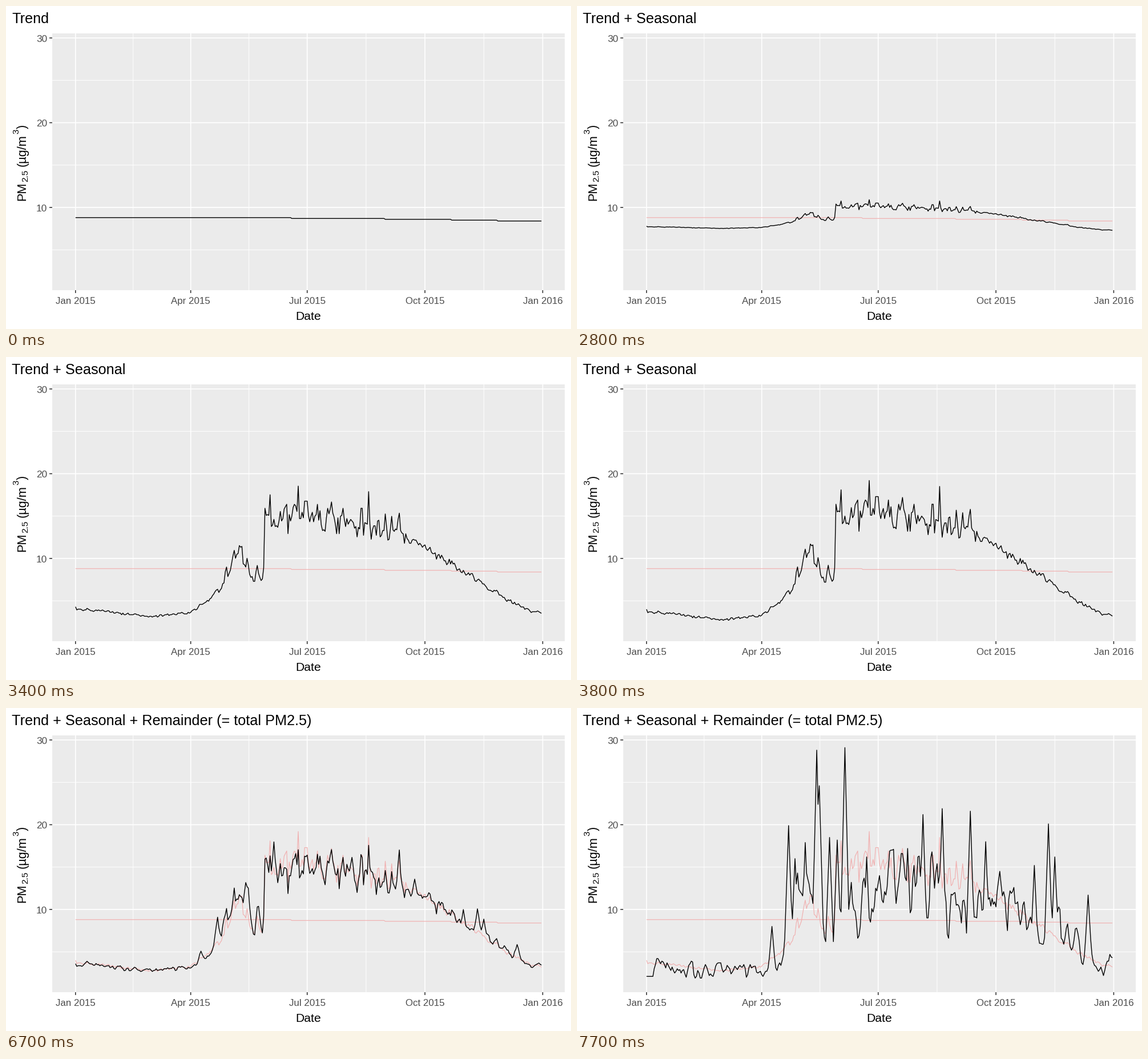
Animation, 990 px wide and 566 px high, one loop 10000 ms. Source, as a matplotlib script:

```python
import numpy as np
import matplotlib.pyplot as plt
from matplotlib.animation import FuncAnimation
from matplotlib.patches import Rectangle

W, H, DPI = 990, 566, 100
LEFT, RIGHT, TOP, BOTTOM = 81, 979, 48, 498
PX = 72 / DPI                      # one pixel in points
MORPH = 16                         # steps of one transition
STARTS = (23, 62)                  # first step of each transition
TITLES = ("Trend", "Trend + Seasonal",
          "Trend + Seasonal + Remainder (= total PM2.5)")

days = np.arange(365)


def px(day):
    return 121.8 + day * 2.2428


def py(value):
    return 353 - (value - 10) * 14.85


def series(level, spikes, wobble, smooth, seed):
    """Key levels with relative noise, topped by a few pointed spikes."""
    white = np.random.default_rng(seed).normal(size=days.size)
    noise = np.convolve(white, [smooth, 1, smooth], "same")
    noise = np.clip(noise / noise.std(), -1.7, 1.7)
    values = np.interp(days, *zip(*level)) * (1 + wobble * noise)
    for day, top in spikes:
        values = np.maximum(values, top * (1 - np.abs(days - day) / 4.5))
    return np.round(values, 1)


def ease(t):
    """Cubic in and out."""
    return 4 * t**3 if t < 0.5 else 1 - 4 * (1 - t)**3


trend = 8.8 - 0.1 * np.searchsorted([168, 241, 293, 329], days)
windy = np.where((days > 116) & (days < 258), 0.085, 0.03)
seasonal = series(
    [(0, 3.8), (58, 2.8), (88, 3.2), (104, 4.8), (114, 6.4), (120, 9.2),
     (130, 10.5), (138, 7.6), (147, 8.6), (148, 15.2), (225, 15),
     (256, 12.8), (274, 11.2), (305, 8.4), (335, 5.1), (356, 3.4), (364, 3.4)],
    [(152, 18.1), (174, 19.2), (229, 18.5), (253, 15.8)], windy, 0.2, 3)
total = series(
    [(0, 3.2), (84, 2.6), (108, 4), (112, 10), (128, 12.5), (138, 7),
     (151, 4.5), (158, 11), (165, 7), (172, 12), (230, 14), (236, 9),
     (274, 12), (290, 9.5), (325, 8), (340, 5), (353, 2.6), (364, 4.6)],
    [(98, 8), (111, 19.9), (116, 16), (124, 17.9), (133, 28.8), (135, 24.6),
     (143, 18.5), (149, 18.2), (155, 29.1), (172, 16.2), (204, 17.2),
     (216, 21.2), (231, 21.9), (253, 21.6), (265, 18), (303, 15.2),
     (314, 20.1), (319, 16.2), (345, 11.7)], 0.2, 0.7, 8)
states = [trend, seasonal, total]

plt.rcParams["font.family"] = "Liberation Sans"
fig = plt.figure(figsize=(W / DPI, H / DPI), dpi=DPI, facecolor="white")
ax = fig.add_axes([0, 0, 1, 1])
ax.set(xlim=(0, W), ylim=(H, 0))
ax.axis("off")


def box(x, y, w, h, color):
    ax.add_patch(Rectangle((x, y), w, h, fc=color, lw=0, snap=False,
                           zorder=1))


def vline(x, y0, y1, width, color="white"):
    box(x - width / 2, y0, width, y1 - y0, color)


def hline(y, x0, x1, width, color="white"):
    box(x0, y - width / 2, x1 - x0, width, color)


def label(x, y, text, size, color="black", **kw):
    return ax.text(x, y, text, fontsize=size * PX, color=color,
                   va="baseline", **kw)


def curve(color, width, z):
    return ax.plot([], [], color=color, lw=width * PX, zorder=z,
                   solid_capstyle="butt", solid_joinstyle="round")[0]


# Panel and grid
box(LEFT, TOP, RIGHT - LEFT, BOTTOM - TOP, "#ebebeb")
months = [(0, "Jan 2015"), (90, "Apr 2015"), (181, "Jul 2015"),
          (273, "Oct 2015"), (365, "Jan 2016")]
for (a, _), (b, _) in zip(months, months[1:]):
    vline(px((a + b) / 2), TOP, BOTTOM, 1)
for value in (5, 15, 25):
    hline(py(value), LEFT, RIGHT, 1)
for day, name in months:
    vline(px(day), TOP, BOTTOM, 1.7)
    vline(px(day), BOTTOM, BOTTOM + 5, 1.6, "#333333")
    label(px(day), 522, name, 16.9, "#4d4d4d", ha="center")
for value in (10, 20, 30):
    hline(py(value), LEFT, RIGHT, 1.7)
    hline(py(value), LEFT - 5, LEFT, 1.6, "#333333")
    label(72, py(value) + 6.7, str(value), 17.2, "#4d4d4d", ha="right")

# Axis titles
label(530, 550, "Date", 21.2, ha="center")
for x, y, text, size in ((34.5, 340.8, "PM", 21.6), (38.5, 308.5, "2.5", 15.4),
                         (34.5, 280.8, "(µg/m", 21.6), (22.5, 224.5, "3", 15.4),
                         (34.5, 214.8, ")", 21.6)):
    label(x, y, text, size, rotation=90, rotation_mode="anchor", ha="left")

title = label(10.3, 30, "", 25.25, ha="left")
shadows = [curve("#f1b0b0", 1.2, 2), curve("#f1b0b0", 1.2, 3)]
line = curve("black", 1.4, 4)


def draw(step):
    stage = sum(step >= s for s in STARTS)
    values = states[stage]
    if stage:
        t = min((step - STARTS[stage - 1] + 1) / MORPH, 1)
        before = states[stage - 1]
        values = before + (values - before) * ease(t)
    for i, shadow in enumerate(shadows):
        shadow.set_data(px(days), py(states[i]))
        shadow.set_visible(i < stage)
    line.set_data(px(days), py(values))
    title.set_text(TITLES[stage])
    return [title, line, *shadows]


anim = FuncAnimation(fig, draw, frames=100, interval=100, repeat=True,
                     repeat_delay=0)
plt.show()
```
